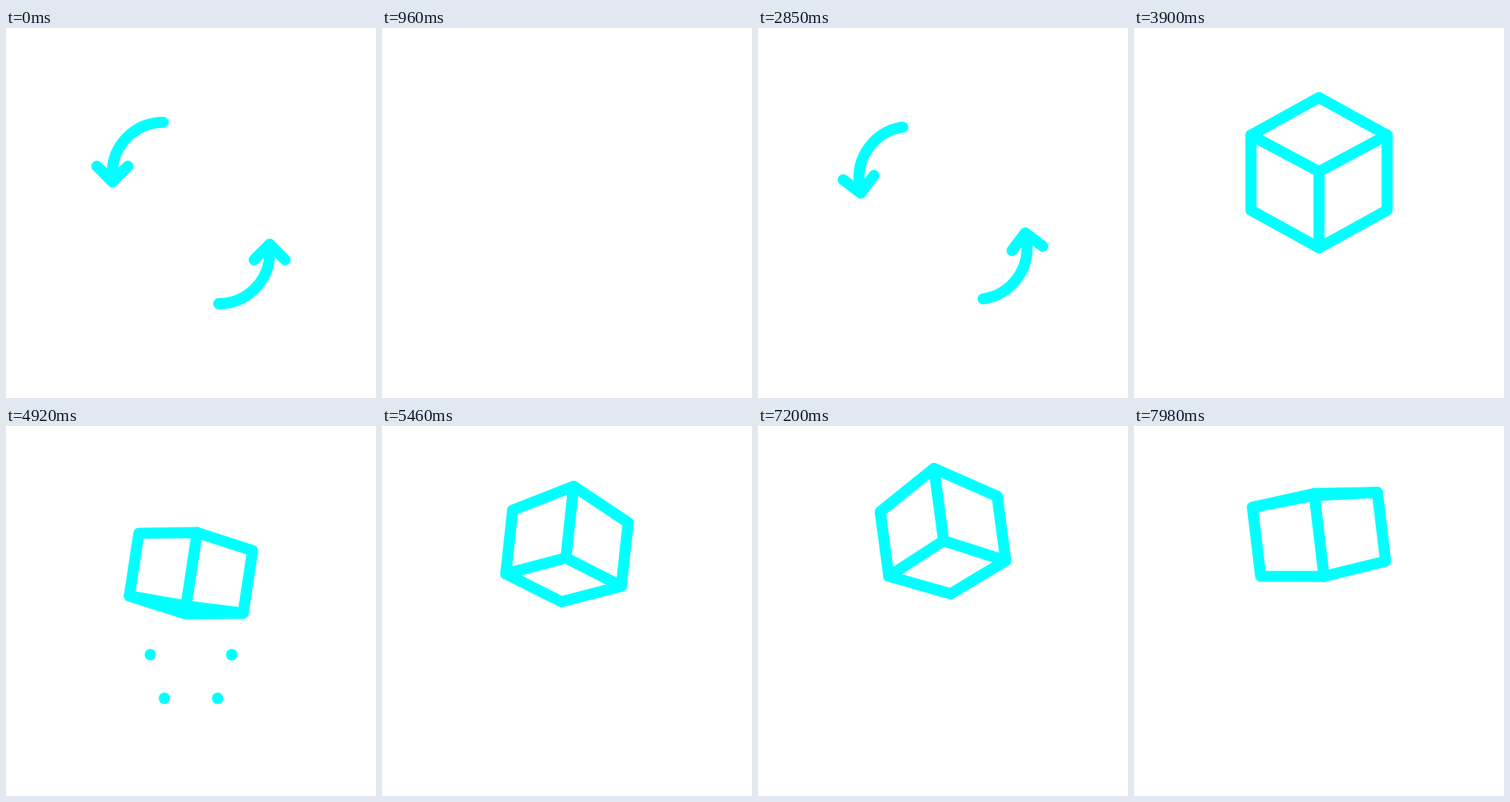
Write an HTML page with a canvas that moves like this. It is 500 px wide and 500 px high and loops after 8 s.

```html
<!DOCTYPE html>
<html lang="en">
<head>
<meta charset="utf-8">
<title>Rotating cube</title>
<style>
  html, body { margin: 0; width: 100%; height: 100%; overflow: hidden; background: #fff; }
  canvas { display: block; width: 100vw; height: 100vh; }
</style>
</head>
<body>
<canvas id="stage" width="500" height="500"></canvas>
<script>
const ctx = document.getElementById('stage').getContext('2d');
const LOOP = 8000, STEP = 30, TURN = 870;
const RAD = Math.PI / 180;

// time, centre y, scale, roll in degrees, tilt, near half edge, far half edge
const CUBE_KEYS = [
  [4200, 195.5, 1, 0, 50, 51.5, 51.5],
  [4920, 199, 0.845, 8.6, -6.5, 59.3, 59],
  [5700, 150, 0.857, 5, -57, 56, 37],
  [6270, 149.7, 0.857, -7.2, -57, 56, 37],
  [7000, 149.7, 0.86, -8, -57, 56, 37],
  [7470, 148, 0.875, -7, -40, 58, 46],
  [7980, 146.3, 0.924, -6.8, 2.5, 59.5, 57.5]
];

const clamp = (v, lo, hi) => Math.min(hi, Math.max(lo, v));
const easeIn = p => p ** 3;
function easeOutBack(p) {
  const back = 1.11, u = 1 - p;
  return 1 + back * u * u - (back + 1) * u ** 3;
}

function sample(keys, t) {
  if (t <= keys[0][0]) return keys[0];
  const i = keys.findIndex(key => key[0] >= t);
  if (i < 0) return keys[keys.length - 1];
  const a = keys[i - 1], b = keys[i];
  const p = (t - a[0]) / (b[0] - a[0]);
  return a.map((v, n) => v + (b[n] - v) * p);
}

function polyline(points, closed) {
  ctx.beginPath();
  points.forEach(([x, y]) => ctx.lineTo(x, y));
  if (closed) ctx.closePath();
  ctx.stroke();
}

function arrow(shown) {
  const tip = [-106.3, -42.3], radius = 68.8;
  const arm = dx => [tip[0] + dx * shown, tip[1] - 21 * shown];
  ctx.beginPath();
  ctx.arc(-37.5, -53.7, radius, (-180 + 90 * shown) * RAD, -180 * RAD, true);
  ctx.lineTo(...tip);
  ctx.stroke();
  polyline([arm(-21), tip, arm(21)]);
}

// amount: 1 is the drawn resting pose, 0 is hidden half a turn away
function arrows(amount) {
  if (amount <= 0) return;
  ctx.save();
  ctx.translate(250, 250);
  ctx.rotate((1 - amount) * Math.PI);
  for (let i = 0; i < 2; i++) {
    arrow(clamp(amount, 0, 1));
    ctx.rotate(Math.PI);
  }
  ctx.restore();
}

function cube(t) {
  const [, cy, scale, roll, tilt, near, far] = sample(CUBE_KEYS, t);
  const fromAbove = tilt > 0;
  const point = (x, y) => [x * scale, y * scale];
  const nearTop = point(0, tilt - near), nearBottom = point(0, tilt + near);
  const top = fromAbove ? point(0, -tilt - far) : nearTop;
  const bottom = fromAbove ? nearBottom : point(0, far - tilt);
  const left = [point(-92, -50.7), point(-92, 50.7)];
  const right = [point(92, -50.7), point(92, 50.7)];
  const side = fromAbove ? 0 : 1;

  ctx.save();
  ctx.translate(250, cy);
  ctx.rotate(roll * RAD);
  polyline([top, right[0], right[1], bottom, left[1], left[0]], true);
  polyline([left[side], fromAbove ? nearTop : nearBottom, right[side]]);
  polyline([nearTop, nearBottom]);
  ctx.restore();
}

// Pulsing dots that drift slowly upwards
function dots(t) {
  const age = t - 4890;
  if (age < 0 || age % 810 > 300) return;
  const rise = clamp((age - 700) / 1900, 0, 1) * 31;
  for (const [dx, y] of [[55, 309], [36, 368]]) {
    for (const side of [-1, 1]) {
      ctx.beginPath();
      ctx.arc(250 + side * dx, y - rise, 7.7, 0, 2 * Math.PI);
      ctx.fill();
    }
  }
}

function draw(now) {
  const t = Math.floor((now % LOOP) / STEP) * STEP;
  ctx.fillStyle = '#fff';
  ctx.fillRect(0, 0, 500, 500);
  ctx.fillStyle = ctx.strokeStyle = '#0ff';
  ctx.lineWidth = 15;
  ctx.lineCap = ctx.lineJoin = 'round';

  if (t < 2310) {
    arrows(1 - easeIn(clamp((t - 90) / TURN, 0, 1)));
  } else if (t < 3900) {
    const p = clamp((t - 2310) / TURN, 0, 1);
    if (p > 0) arrows(easeOutBack(p));
  } else {
    cube(t);
    dots(t);
  }
}

const start = performance.now();
function tick() {
  draw(performance.now() - start);
  requestAnimationFrame(tick);
}
tick();
</script>
</body>
</html>
```
